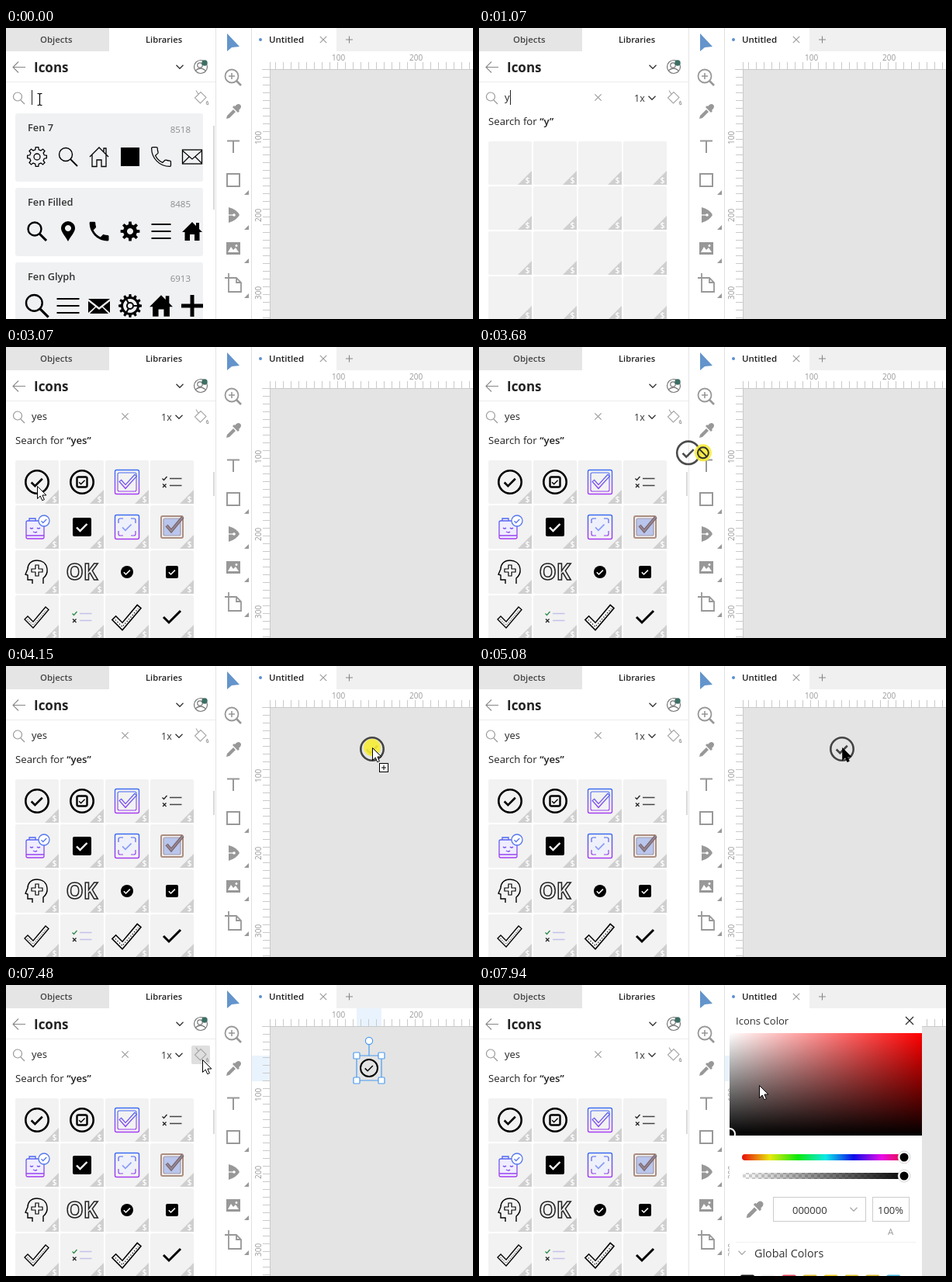
Animation of 602 by 375 pixels, one loop 8000 ms. Source, as an HTML page:

```html
<!DOCTYPE html>
<html lang="en">
<head>
<meta charset="utf-8">
<title>Icon library</title>
<style>
  html, body { margin: 0; width: 100%; height: 100%; overflow: hidden; background: #fff; }
  svg { display: block; }
  text { font-family: "Open Sans", "Noto Sans", sans-serif; white-space: pre; }
</style>
</head>
<body>
<svg id="stage" width="602" height="375" viewBox="0 0 602 375"></svg>
<script>
const LOOP = 8000;
const stage = document.getElementById('stage');

// Markup helpers
const rect = (x, y, w, h, fill, extra = '') =>
  `<rect x="${x}" y="${y}" width="${w}" height="${h}" fill="${fill}" ${extra}/>`;
const path = (d, fill = '#000', extra = '') => `<path d="${d}" fill="${fill}" ${extra}/>`;
const line = (d, color = '#000', width = 1, extra = '') =>
  `<path d="${d}" fill="none" stroke="${color}" stroke-width="${width}" ${extra}/>`;
const disc = (x, y, r, fill, extra = '') => `<circle cx="${x}" cy="${y}" r="${r}" fill="${fill}" ${extra}/>`;
const ring = (x, y, r, color = '#000', width = 1) =>
  disc(x, y, r, 'none', `stroke="${color}" stroke-width="${width}"`);
const label = (x, y, str, size, color = '#222', weight = 400, extra = '') =>
  `<text x="${x}" y="${y}" font-size="${size}" fill="${color}" font-weight="${weight}" ${extra}>${str}</text>`;
const at = (x, y, body, scale = 1) => `<g transform="translate(${x} ${y}) scale(${scale})">${body}</g>`;
const layer = (id, body, extra = '') => `<g id="${id}" ${extra}>${body}</g>`;
const repeat = (n, make) => Array.from({ length: n }, (_, i) => make(i)).join('');

// Icons, all drawn around 0,0
const CHECK = 'M-7 .5l4.500 4.500 9-9';
const check = (color = '#000', width = 2.4, scale = 1) => at(0, 0, line(CHECK, color, width), scale);
const roundCheck = ring(0, 0, 14.7, '#000', 2.6) + check('#000', 2.5, 1.05);
const lens = width => ring(-3, -3, 8.5, '#000', width) + line('M3 3L12 12', '#000', width * 1.3);
function gear(teeth, outer, inner) {
  const points = [];
  for (let i = 0; i < teeth; i++)
    [[-.3, inner], [-.18, outer], [.18, outer], [.3, inner]].forEach(([off, r]) => {
      const a = (i + off) / teeth * 2 * Math.PI;
      points.push(`${(r * Math.sin(a)).toFixed(2)} ${(-r * Math.cos(a)).toFixed(2)}`);
    });
  return 'M' + points.join('L') + 'z';
}
const PHONE = 'M6.600 10.800c1.400 2.800 3.800 5.100 6.600 6.600l2.200-2.200c.3-.3.7-.4 1-.2 1.100.4 2.300.6 3.600.6.6 0 1 .4 1 1V20c0 .6-.4 1-1 1C10.600 21 3 13.400 3 4c0-.6.5-1 1-1h3.500c.6 0 1 .4 1 1 0 1.300.2 2.500.6 3.600.1.3 0 .7-.2 1z';
const phone = (fill, extra = '') => at(-16.5, -16.5, path(PHONE, fill, extra), 1.38);
const menu = (w, width) => line(`M${-w} -9H${w}M${-w} 0H${w}M${-w} 9H${w}`, '#000', width);
const HOUSE = 'M-12 0L0-12 12 0M-9-2.500V12.500H-3V4H3V12.500H9V-2.500M6-6.500v-4.500h3v7.500';
const house = path('M-13 1L0-12 5-7v-4h4v8l4 4H9.500V12H3V4H-3V12H-9.500V1z');
const mail = rect(-12.5, -9, 25, 18, 'none', 'stroke="#000" stroke-width="1.300"') +
  line('M-12.500-8L0 3 12.500-8M-12 8l8-8M12 8L4 0', '#000', 1.1);
const mailFilled = path('M-14-9H14L0 2zM-14-6l9 7-9 8zM14-6l-9 7 9 8zM-12 10l8-8 4 3 4-3 8 8z');
const pin = path('M0 13C-3 7-9 1-9-4a9 9 0 0 1 18 0C9 1 3 7 0 13zM0-8a4 4 0 1 0 .01 0z', '#000', 'fill-rule="evenodd"');
const gearFilled = path(gear(8, 12.5, 9) + 'M0-4a4 4 0 1 0 .01 0z', '#000', 'fill-rule="evenodd"');
const gearSpokes = path(gear(12, 15, 12) + 'M0-9a9 9 0 1 0 .01 0z', '#000', 'fill-rule="evenodd"') +
  ring(0, 0, 4, '#000', 2) + line('M4 0H10M-2-3.500L-5-8.700M-2 3.500L-5 8.700', '#000', 2);

const cardRows = [
  ['Fen 7', 8518, [
    line(gear(8, 12.5, 9.5), '#000', 1.3) + ring(0, 0, 4, '#000', 1.3), lens(1.4),
    line(HOUSE, '#000', 1.3), rect(-12, -12, 24, 24, '#000'),
    phone('none', 'stroke="#000" stroke-width=".9"'), mail]],
  ['Fen Filled', 8485, [lens(2.4), pin, phone('#000'), gearFilled, menu(12.5, 2), house]],
  ['Fen Glyph', 6913, [
    at(0, 0, lens(2), 1.22), menu(14.5, 2), mailFilled,
    gearSpokes, at(0, 0, house, 1.15), line('M-14 0H14M0-14V14', '#000', 5)]]
];
const cards = cardRows.map(([name, count, icons], row) => at(12, 110 + row * 96,
  rect(0, 0, 242, 88, '#f0f1f3', 'rx="3"') +
  label(16, 23, name, 12.8, '#333', 600) + label(226, 25, count, 11.5, '#8b8b8b', 400, 'text-anchor="end"') +
  icons.map((icon, i) => at(28 + i * 40, 56, icon)).join(''))).join('');

const frame = (half, color, width, fill = 'none') =>
  rect(-half, -half, 2 * half, 2 * half, fill, `rx="2" stroke="${color}" stroke-width="${width}"`);
const list = (tick, cross, bar) => line('M-12.500-4.500l2 2 4-4.500', tick, 1.3) +
  line('M-12 2.500l4.500 4.500m0-4.500l-4.500 4.500', cross, 1.3) + line('M-3-4.500H12.500M-3 4.500H12.500', bar, 1.4);
const slantCheck = line('M-16 3l4-4 7 7L11-13l4 3.500L-5 14z', '#000', 1.3) +
  line('M-12.500 3l7.500 7.500L12-9', '#000', 1, 'stroke-dasharray="1 2"');
const PURPLE = 'url(#purple)';
const results = [
  roundCheck,
  ring(0, 0, 14.7, '#000', 2.6) + frame(6.5, '#000', 2.4) + check('#000', 2.4, .55),
  frame(15.5, PURPLE, 1.4) + frame(12, PURPLE, 1.1) + line('M-9-2l7 8L11.500-9', PURPLE, 4.6) +
    line('M-8.300-1.200l6.300 7L10.800-8.200', '#f2f2f2', 2),
  list('#222', '#222', '#444'),
  rect(-14, -8, 23, 23, '#f0edff', `stroke="${PURPLE}" stroke-width="1.300" rx="2"`) +
    line('M-14 11H9M-10-8v-3h8v3M-9 1q2 2 4 0M0 1q2 2 4 0M-5 6q3 2 5 0', PURPLE, 1.3) +
    disc(9, -8, 7, '#fff', 'stroke="#5577ee" stroke-width="1.300"') + at(9, -8, check('#5577ee', 2.5, .5)),
  rect(-12, -12, 24, 24, '#000', 'rx="2"') + check('#fff', 2.4, 1),
  frame(15.5, PURPLE, 1.5) + frame(11, PURPLE, 1.2, '#eef0fc') +
    line('M-5-11H5M-5 11H5M-11-5V5M11-5V5', '#f0f1f6', 3) + check('#8a9cf5', 2, .85),
  frame(14, '#ab8d80', 2) + frame(11, '#a39aaa', 1.2, '#b9c5ec') +
    line('M-7-2l6 7L14-13', '#7b666a', 4.2) + line('M-7-2l6 7L14-13', '#98899a', 1.6),
  `<g transform="scale(-1 1)">` + line('M-8 15V8q-6-5-5-12C-12-12-6-15 0-15c8 0 12 5 12 11l3 7-3 1v6H6v5', '#000', 1.4) +
    path('M-2-9H2v5H7V0H2v5h-4V0h-5v-4h5z', '#fff', 'stroke="#000" stroke-width="1.200"') + '</g>',
  label(0, 10, 'OK', 28, '#f2f2f2', 700, 'text-anchor="middle" stroke="#222" stroke-width="1.500"'),
  disc(0, 0, 8, '#000') + check('#fff', 2.6, .6),
  rect(-8, -8, 16, 16, '#000', 'rx="2"') + check('#fff', 2.6, .6),
  slantCheck,
  list('#2c8a4b', '#222', '#c3c2ea'),
  at(0, 0, slantCheck, 1.2),
  line('M-11 0l7 7L11-8', '#000', 3)
];
const cell = i => [12 + i % 4 * 58, 146 + Math.floor(i / 4) * 58];
const tiles = repeat(16, i => at(...cell(i), rect(0, 0, 56, 56, '#f2f2f2', 'rx="2"') +
  path('M56 38V56H38z', '#cfcfcf') + label(47.500, 54, '$', 10.5, '#fff', 600)));
const resultIcons = results.map((icon, i) => at(cell(i)[0] + 28, cell(i)[1] + 28, icon)).join('');

// Static chrome
const chevron = (x, y, color = '#333', s = 4.5) => line(`M${x - s} ${y - s / 2}l${s} ${s} ${s} ${-s}`, color, 1.3);
const cross = (x, y, s, color) => line(`M${x - s} ${y - s}l${2 * s} ${2 * s}m0 ${-2 * s}l${-2 * s} ${2 * s}`, color, 1.1);
const GRAY = '#989898';
const dropper = path('M-9 9l1-4 8-8 3 3-8 8zM-1-6l2-2 1 1 2-2q3-2 5 0t0 5l-2 2 1 1-2 2z', GRAY);
const bucket = at(250, 89, line('M-6.500 1L1-6.500 8 .5 .5 8zM-2-3.500l-3-5M9.500 5q-2.500 3.500 0 4.500t0-4.500', '#a5a5a5', 1.1));

const panel = rect(0, 0, 271, 375, '#fff') + rect(0, 0, 133, 30, '#e5e5e5') +
  label(44, 19, 'Objects', 11.4, '#444', 600) + label(180, 19, 'Libraries', 11.2, '#222', 600) +
  line('M25 50.500H9M16 43.500l-7 7 7 7', '#888', 1.1) + label(36, 57, 'Icons', 17, '#222', 700) +
  chevron(224, 50) + ring(251, 50, 8.5, '#777', 1.2) + ring(250, 48, 3.2, '#777', 1.2) +
  line('M244 55q7-6 13 0', '#777', 1.2) + disc(256, 45, 3.7, '#3c6e63') +
  rect(0, 69, 270, 1, '#ececec') + ring(15, 88.500, 5.5, '#999', 1.2) + line('M19 93l5 5', '#999', 1.3);

const toolbar = rect(270, 0, 1, 375, '#e4e4e4') + rect(271, 0, 45, 375, '#fff') + rect(316, 0, 1, 375, '#e0e0e0') +
  path('M285 7V30l6-5 10-1z', '#6394cb') +
  ring(291, 62, 8.5, GRAY, 1.8) + line('M297 68l6 6', GRAY, 2.6) + line('M287 62h8m-4-4v8', GRAY, 1.6) +
  at(293, 108, dropper) + line('M285 145.500h16M293 145v16', GRAY, 2) +
  rect(285, 188, 16, 16, 'none', `stroke="${GRAY}" stroke-width="2"`) +
  path('M287 231q11 3 14 10-4 7-14 10z', GRAY) + line('M287 241h6', '#fff', 1.2) + disc(294, 241, 1.8, '#fff') +
  path('M284 276h18v16h-18zM286 289h14l-4-6-3 3-3-4zM297 279a1.500 1.500 0 1 0 .01 0z', GRAY, 'fill-rule="evenodd"') +
  line('M287 316v24h16v-12l-6-6h-15M297 322v6h6', GRAY, 1.8) +
  [215, 260, 303, 348].map(y => path(`M313 ${y - 6}v6h-6z`, '#999')).join('');

const TICK = '#cacaca';
const canvasArea = rect(317, 0, 285, 375, '#fff') + rect(426, 0, 176, 30, '#f0f0f0') +
  disc(328, 15, 2, '#5b8fd0') + label(339, 19, 'Untitled', 11.5, '#222', 600) + cross(409, 15, 4.2, '#999') +
  line('M438 15h9M442.500 10.500v9', '#888', 1.1) +
  layer('rulerMarks', rect(452, 30, 32, 23, '#e9f3fd') + rect(317, 91, 23, 33, '#e9f3fd')) +
  repeat(26, i => rect(347 + i * 10, 44, 1, 9, TICK)) +
  repeat(32, i => rect(331, 63 + i * 10, 9, 1, TICK)) +
  rect(330, 53, 272, 1, TICK) + rect(340, 44, 1, 331, TICK) + rect(341, 54, 261, 321, '#e4e4e4') +
  [100, 200].map(n => label(n + 320, 42, n, 10, '#999')).join('') +
  [100, 200, 300].map(n => label(0, 0, n, 10, '#999', 400, `transform="translate(329 ${n + 50}) rotate(-90)"`)).join('');

const BLUE = '#4a9cf0';
const selection = at(468, 107, ring(0, 0, 11, '#000', 2) + check('#000', 2, .75)) +
  line('M468 91V76', BLUE, 1.2) + line('M452 91h32v32h-32z', BLUE, 1.2) +
  disc(468, 72, 4.6, '#fff', `stroke="${BLUE}" stroke-width="1.200"`) +
  [[452, 91], [484, 91], [452, 123], [484, 123]].map(([x, y]) =>
    rect(x - 4, y - 4, 8, 8, '#fff', `rx="1" stroke="${BLUE}" stroke-width="1.200"`)).join('');

const knob = y => disc(548, y, 8, '#fff', 'stroke="#bbb" stroke-width=".6"') + disc(548, y, 5.5, '#000');
const swatches = ['#111', '#f2f2f2', '#e0455a', '#dcb92c', '#eec81e', '#dfc12c', '#d4b52c', '#45b0d8'];
const popup = rect(323, 30, 248, 345, '#fff') + label(331, 51, 'Icons Color', 13.1, '#333') + cross(555, 46, 5, '#222') +
  rect(323, 62, 248, 132, 'url(#redFade)') + rect(323, 62, 248, 132, 'url(#blackFade)') +
  `<g clip-path="url(#pickerClip)">${ring(323, 192, 7, '#fff', 2)}</g>` +
  rect(339, 218, 216, 8, 'url(#hues)', 'rx="4"') +
  rect(339, 242, 216, 8, 'url(#checker)', 'rx="4"') + rect(339, 242, 216, 8, 'url(#alpha)', 'rx="4"') +
  knob(222) + knob(246) + at(355, 290, dropper, 1.15) +
  rect(379.5, 273.5, 119, 31, '#fff', 'stroke="#ccc"') + rect(507.5, 273.5, 47, 31, '#fff', 'stroke="#ccc"') +
  label(404, 295, '000000', 13, '#333') + chevron(483, 289, '#aaa') + label(514, 295, '100%', 13, '#333') +
  label(527, 322, 'A', 11.5, '#999') + rect(331, 331, 232, 1, '#f0f0f0') +
  chevron(339, 345, '#aaa') + label(355, 351, 'Global Colors', 14.3, '#333') +
  swatches.map((color, i) => rect(337 + i * 26.9, 373.5, 18, 10, color, 'rx="2"')).join('');

const stops = (...list) => list.map(([color, offset, opacity = 1]) =>
  `<stop offset="${offset}" stop-color="${color}" stop-opacity="${opacity}"/>`).join('');
const gradient = (id, list, dir = '') => `<linearGradient id="${id}" ${dir}>${stops(...list)}</linearGradient>`;
const defs = '<defs>' +
  gradient('purple', [['#3d6df2', 0], ['#a63cf0', 1]], 'gradientUnits="userSpaceOnUse" x1="0" y1="-15" x2="0" y2="15"') +
  gradient('redFade', [['#fff', 0], ['#f00', 1]]) +
  gradient('blackFade', [['#000', 0, 0], ['#000', 1]], 'x2="0" y2="1"') +
  gradient('hues', Array.from({ length: 7 }, (_, i) => [`hsl(${i * 60},90%,48%)`, i / 6])) +
  gradient('alpha', [['#000', 0, 0], ['#000', 1]]) +
  '<pattern id="checker" width="8" height="8" patternUnits="userSpaceOnUse">' +
  rect(0, 0, 8, 8, '#fff') + path('M0 0h4v8h4V4H0z', '#d4d4d4') + '</pattern>' +
  '<clipPath id="pickerClip">' + rect(323, 62, 248, 132, '#000') + '</clipPath>' +
  '<clipPath id="cardClip">' + rect(12, 100, 242, 275, '#000') + '</clipPath></defs>';

const ARROW = 'M.5 .5V16.500l3.700-3.500 2.500 5.700 2.700-1.100-2.500-5.600h5z';
const cursors = layer('highlight', disc(0, 0, 11, '#f7ec36', 'fill-opacity=".9"')) +
  layer('noDrop', ring(0, 0, 7, '#333', 2) + line('M-5-5L5 5', '#333', 2)) +
  layer('whiteArrow', path(ARROW, '#fff', 'stroke="#000"')) +
  layer('blackArrow', path(ARROW, '#000', 'stroke="#000" stroke-width=".6"')) +
  layer('copyBadge', rect(9.5, 20.500, 11, 11, '#fff', 'stroke="#000"') + line('M12 26h6M15 23v6', '#000', 1));

stage.innerHTML = defs + panel + layer('hover', rect(239, 78, 24, 24, '#dfdfdf', 'rx="2"')) + bucket +
  layer('cards', cards, 'clip-path="url(#cardClip)"') +
  layer('search', cross(153.500, 89.500, 4.2, '#999') + label(200, 95, '1x', 12.5, '#333') + chevron(223, 90) +
    label(12, 125, 'Search for <tspan id="quoted" font-weight="600"></tspan>', 13.2) + tiles) +
  layer('results', resultIcons) +
  `<rect id="scrollbar" x="267" width="2" fill="#dadada"/>` +
  label(33, 94, '', 13, '#222', 400, 'id="query"') + `<rect id="caret" y="80" width="1" height="19" fill="#222"/>` +
  toolbar + canvasArea + layer('selection', selection) + layer('popup', popup) +
  layer('ibeam', line('M40.500 84.500h2l1 1 1-1h2M43.500 85v14M40.500 99.500h2l1-1 1 1h2', '#000', 1.2)) +
  layer('dragged', roundCheck, 'opacity=".7"') + layer('pointer', cursors);

const node = {};
stage.querySelectorAll('[id]').forEach(el => { node[el.id] = el; });
const show = (id, on) => { node[id].style.display = on ? '' : 'none'; };
const place = (id, x, y) => node[id].setAttribute('transform', `translate(${x} ${y})`);

// Pointer moves in short hops: start, hop length, hop count, end point, ease-out power
const moves = [
  [2510, 62, 5, 40, 179, 1.2],
  [3450, 76, 10, 472, 105, 1.68],
  [4310, 130, 4, 468, 105, 1],
  [5460, 76, 1, 468, 107, 1],
  [6320, 76, 10, 253, 96, 1.07],
  [7870, 70, 2, 361, 129, 1]
];
function pointerAt(t) {
  let x = 51, y = 145;
  for (const [start, hop, count, endX, endY, power] of moves) {
    if (t < start) break;
    const u = Math.min(1, (Math.floor((t - start) / hop) + 1) / count);
    const p = 1 - (1 - u) ** power;
    x += (endX - x) * p;
    y += (endY - y) * p;
  }
  return [x, y];
}

function render(t) {
  const within = (from, to) => t >= from && t < to;
  const typed = 'yes'.slice(0, t < 610 ? 0 : t < 1220 ? 1 : t < 1350 ? 2 : 3);
  const [x, y] = pointerAt(t);
  const onCanvas = x > 341;
  const pressed = within(3150, 5080);
  const dragging = within(3450, 5080);
  const moving = within(3450, 4130);

  node.query.textContent = typed;
  node.quoted.textContent = `“${typed}”`;
  node.caret.setAttribute('x', [33, 40, 47, 53][typed.length]);
  show('caret', t < 230 || within(610, 1900) || within(2200, 2700));
  show('ibeam', t < 460 || within(610, 1070));
  show('cards', t < 610);
  show('search', t >= 610);
  show('results', t >= 1900);
  show('scrollbar', t < 610 || t >= 1900);
  node.scrollbar.setAttribute('y', t < 610 ? 126 : 161);
  node.scrollbar.setAttribute('height', t < 610 ? 108 : 31);

  show('rulerMarks', t >= 5460);
  show('selection', t >= 5460);
  show('hover', within(7000, 7870));
  show('popup', t >= 7560);

  show('dragged', within(3450, 5160));
  place('dragged', x - (moving ? 19 : 0), y + (moving ? 0 : 2));
  show('pointer', t >= 2370);
  place('pointer', x, y);
  const black = within(5080, 7330) && onCanvas;
  const forbidden = dragging && !onCanvas;
  show('highlight', pressed);
  show('noDrop', forbidden);
  show('blackArrow', black);
  show('whiteArrow', !black && !forbidden);
  show('copyBadge', dragging && onCanvas);
}

const begin = performance.now();
function tick() {
  render((performance.now() - begin) % LOOP);
  requestAnimationFrame(tick);
}
tick();
</script>
</body>
</html>
```
